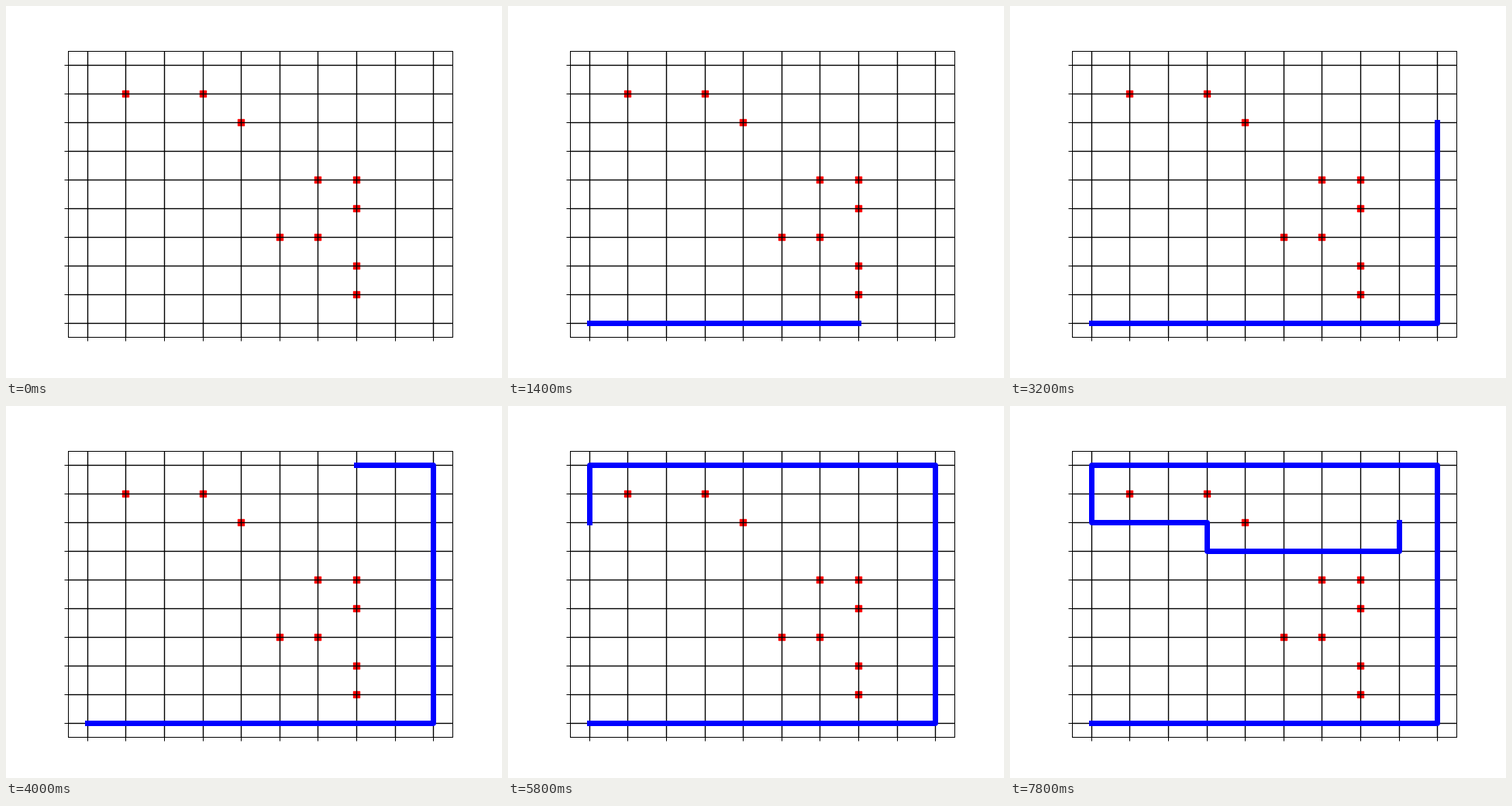
A matplotlib script that plays this animation: 640x480 px, repeating every 8 s.

```python
import numpy as np
import matplotlib.pyplot as plt
from matplotlib.animation import FuncAnimation

INTERVAL = 200
DPI = 100
PIXEL = 72 / DPI  # one screen pixel in points
SIZE = 10

# Directions on the complex plane.
RIGHT, UP, LEFT, DOWN = 1, 1j, -1, -1j

# Rows blocked in each column.
BLOCKED = {1: [8], 3: [8], 4: [7], 5: [3], 6: [3, 5], 7: [1, 2, 4, 5]}


def walk(*legs):
    """Visit every cell from the origin along (direction, length) legs."""
    directions, lengths = zip(*legs)
    steps = np.repeat(directions, lengths)
    return np.concatenate([[0], np.cumsum(steps)])


EDGE = SIZE - 1
path = walk((RIGHT, EDGE), (UP, EDGE), (LEFT, EDGE), (DOWN, 2),
            (RIGHT, 3), (DOWN, 1), (RIGHT, 5), (UP, 1))

fig, ax = plt.subplots(figsize=(6.4, 4.8), dpi=DPI)
cells = range(SIZE)
limits = (-0.5, SIZE - 0.5)
ax.set(xlim=limits, ylim=limits, xticks=cells, yticks=cells)
ax.tick_params(labelbottom=False, labelleft=False, width=PIXEL)
for spine in ax.spines.values():
    spine.set_linewidth(PIXEL)
ax.grid(color="black", linewidth=1)

for column, rows in BLOCKED.items():
    ax.scatter([column] * len(rows), rows, c="red", marker="s")
route, = ax.plot([], [], color="blue", linewidth=7 * PIXEL)


def update(frame):
    # One more cell per frame; a lone starting cell stays hidden.
    shown = path[:frame + 1] if frame else path[:0]
    route.set_data(shown.real, shown.imag)
    return route,


anim = FuncAnimation(fig, update, frames=len(path), interval=INTERVAL,
                     repeat=True, repeat_delay=0)
plt.show()
```
